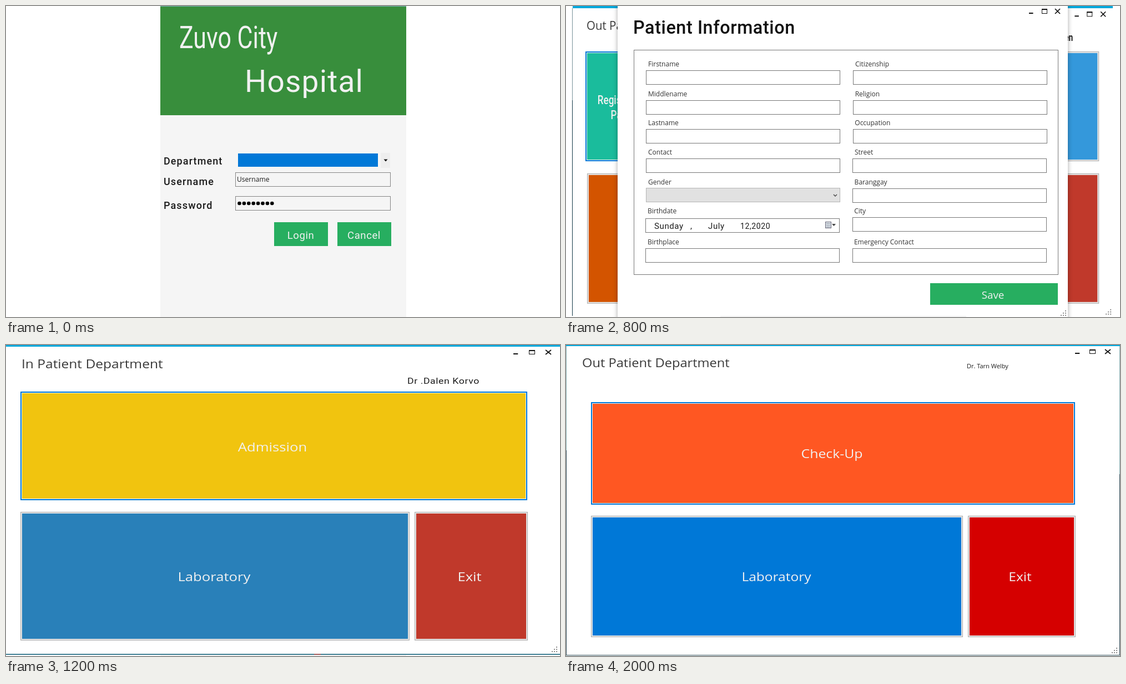
An HTML page with a canvas for the animation above (2.4 s loop, 998 by 561 pixels).

```html
<!DOCTYPE html>
<html lang="en">
<head>
<meta charset="utf-8">
<title>Hospital system screens</title>
<style>
  html, body { margin: 0; width: 100%; height: 100%; overflow: hidden; background: #fff; }
  canvas { display: block; width: 998px; height: 561px; }
</style>
</head>
<body>
<canvas id="stage" width="998" height="561"></canvas>
<script>
const ctx = document.getElementById('stage').getContext('2d');
const SCREEN_MS = 400;
const CYAN = '#00a8dc', BLUE = '#0078d7', GREEN = '#27ae60', DARK = '#1c1c1c', PALE = '#f1f1f1';

// Each face: family, weight, horizontal proportion, tracking
const FACES = {
  din:        ['Roboto, sans-serif', 400, 1, 0.6],
  dinBanner:  ['Roboto, sans-serif', 400, 1, 1.2],
  dinLabel:   ['Roboto, sans-serif', 500, 1, 1.1],
  dinHeading: ['Roboto, sans-serif', 500, 1, 0.6],
  dinNarrow:  ['Roboto, sans-serif', 400, 0.78, 0],
  dinNarrowMedium: ['Roboto, sans-serif', 500, 0.78, 0],
  dinNarrowBold: ['Roboto, sans-serif', 700, 0.75, 0],
  dinWide:    ['Roboto, sans-serif', 400, 1.14, 0.5],
  ui:         ['"Open Sans", sans-serif', 400, 1, 0],
  uiTight:    ['"Open Sans", sans-serif', 400, 0.93, 0],
  uiNarrow:   ['"Open Sans", sans-serif', 400, 0.85, 0],
  uiNarrowBold: ['"Open Sans", sans-serif', 700, 0.88, 0],
  uiWide:     ['"Open Sans", sans-serif', 400, 1.14, 0],
  uiWideTitle: ['"Open Sans", sans-serif', 400, 1.1, 0],
  grid:       ['"Liberation Sans", Arial, sans-serif', 400, 0.8, 0]
};

function text(str, x, y, size, face, color = DARK, align = 'left') {
  const [family, weight, proportion, tracking] = FACES[face];
  ctx.save();
  ctx.translate(x, y);
  ctx.scale(proportion, 1);
  ctx.font = `${weight} ${size}px ${family}`;
  ctx.letterSpacing = tracking + 'px';
  ctx.textAlign = align;
  ctx.fillStyle = color;
  ctx.fillText(str, 0, 0);
  ctx.restore();
}

function box(left, top, right, bottom, fill, border) {
  ctx.fillStyle = fill;
  ctx.fillRect(left, top, right - left, bottom - top);
  if (!border) return;
  ctx.strokeStyle = border;
  ctx.lineWidth = 1;
  ctx.strokeRect(left + 0.5, top + 0.5, right - left - 1, bottom - top - 1);
}

function line(points, color = '#111', width = 1) {
  ctx.beginPath();
  points.forEach(([x, y]) => ctx.lineTo(x, y));
  ctx.strokeStyle = color;
  ctx.lineWidth = width;
  ctx.stroke();
}

function chevron(x, y, dir, color = '#444') {
  line([[x - 3, y - dir * 1.5], [x, y + dir * 1.5], [x + 3, y - dir * 1.5]], color, 1.4);
}

function dropArrow(x, y, color = '#111') {
  ctx.fillStyle = color;
  ctx.beginPath();
  ctx.moveTo(x - 3.5, y - 2);
  ctx.lineTo(x + 3.5, y - 2);
  ctx.lineTo(x, y + 2);
  ctx.fill();
}

// Large button with a double frame; the focused one has a blue edge
function tile(left, top, right, bottom, fill, focusWidth = 0) {
  const edge = focusWidth || 1;
  const inset = focusWidth ? focusWidth + 1 : 3;
  box(left, top, right, bottom, focusWidth ? BLUE : '#adadad');
  box(left + edge, top + edge, right - edge, bottom - edge, focusWidth ? '#f4f4f4' : '#e4e4e4');
  box(left + inset, top + inset, right - inset, bottom - inset, fill);
}

function windowButtons(minX, maxX, closeX, top, w = 10, h = 9) {
  box(minX, top + h - 2, minX + w * 0.75, top + h, '#111');
  box(maxX, top, maxX + w, top + h, '#fff', '#111');
  box(maxX, top, maxX + w, top + 2, '#111');
  line([[closeX, top], [closeX + w - 1, top + h]], '#111', 1.7);
  line([[closeX + w - 1, top], [closeX, top + h]], '#111', 1.7);
}

function grip(right, bottom) {
  for (let row = 0; row < 3; row++)
    for (let col = 0; col < 3 - row; col++)
      box(right - 2 - col * 4, bottom - 2 - row * 4, right - col * 4, bottom - row * 4, '#8c8c8c');
}

function login() {
  box(278, 0, 721, 561, '#f5f5f5');
  box(278, 0, 721, 197, '#388e3c');
  box(278, 0, 721, 1, '#78adb4');
  text('Zuvo City', 312, 76, 55, 'dinNarrow', PALE);
  text('Hospital', 430, 155, 55, 'dinBanner', PALE);

  text('Department', 284, 286, 18, 'dinLabel');
  text('Username', 284, 323, 18, 'dinLabel');
  text('Password', 284, 366, 18, 'dinLabel');

  box(418, 266, 670, 290, BLUE);
  box(675, 265, 692, 292, '#eeeeee');
  dropArrow(684, 278.5);
  box(413, 300, 693, 326, '#f5f5f5', '#858585');
  text('Username', 416, 317, 13, 'uiTight');
  box(413, 343, 693, 369, '#f5f5f5', '#858585');
  ctx.fillStyle = '#000';
  for (let i = 0; i < 8; i++) {
    ctx.beginPath();
    ctx.arc(420.5 + i * 8.4, 356, 3.3, 0, 7);
    ctx.fill();
  }

  box(483, 390, 580, 433, GREEN);
  box(597, 390, 694, 433, GREEN);
  text('Login', 531, 419.5, 18.5, 'din', PALE, 'center');
  text('Cancel', 645, 419.5, 18.5, 'din', PALE, 'center');
}

function bottomStrip() {
  box(278, 559, 721, 561, '#f3f3f3');
}

function outPatientContent(focusWidth) {
  text('Out Patient Department', 35, 41, 22, 'uiTight', '#3a3a3a');
  text('Welcome', 679, 61, 18.5, 'dinNarrowBold');
  text(':', 744, 61, 18.5, 'dinNarrowBold');
  text('Nurse Meridan Jolsten', 914, 61, 18.5, 'dinNarrowBold', DARK, 'right');
  windowButtons(917, 939, 964, 8);

  tile(33, 80, 184, 279, '#1abc9c', focusWidth);
  tile(205, 80, 634, 279, '#f1c40f');
  tile(642, 80, 961, 279, '#3498db');
  tile(36, 301, 786, 537, '#d35400');
  tile(793, 301, 961, 537, '#c0392b');
  const label = (str, x, y) => text(str, x, y, 22, 'dinNarrowMedium', PALE, 'center');
  label('Register New', 106, 175);
  label('Patient', 106, 203);
  label('Search', 417, 190);
  label('Laboratory Result', 800, 190);
  label('Checkup', 409, 428);
  label('Exit', 875, 428);
  grip(983, 557);
}

function outPatientNurse() {
  box(12, 0, 985, 2, CYAN);
  outPatientContent(1);
  bottomStrip();
}

function patientForm() {
  box(12, 0, 985, 4, CYAN);
  ctx.save();
  ctx.transform(0.997, 0, 0, 0.9955, 2.1, 2.3);
  outPatientContent(2);
  ctx.restore();
  box(11, 4, 12, 170, '#78929a');
  box(11, 170, 12, 559, '#163a48');

  ctx.save();
  ctx.shadowColor = 'rgba(0,0,0,.35)';
  ctx.shadowBlur = 8;
  box(93, -20, 904, 580, '#fff');
  ctx.restore();
  bottomStrip();
  windowButtons(834, 857, 881, 5);
  text('Patient Information', 121, 50, 32.3, 'dinHeading', '#111');
  box(122, 79, 887, 485, '#fff', '#777');

  const tops = [116, 170, 222, 275, 329, 381, 437];
  const left = ['Firstname', 'Middlename', 'Lastname', 'Contact', 'Gender', 'Birthdate', 'Birthplace'];
  const right = ['Citizenship', 'Religion', 'Occupation', 'Street', 'Baranggay', 'City', 'Emergency Contact'];
  tops.forEach((top, i) => {
    const drift = i > 4 ? 1 : 0;
    const labelY = top - 7;
    text(left[i], 148 - drift, labelY, 12, 'ui', '#333');
    text(right[i], 521 - i * 0.35, labelY, 12, 'ui', '#333');
    const leftTop = i === 4 ? 328 : i === 5 ? 383 : top;
    if (i === 4) box(144, leftTop, 494, leftTop + 26, '#e1e1e1', '#b5b5b5');
    else box(144 - drift, leftTop, 494 - drift, leftTop + 26, '#fff', '#777');
    const x = i < 3 ? 517 : 516;
    box(x, top, x + 350, top + 26, '#fff', '#777');
  });
  chevron(485, 341.5, 1);

  text('Sunday', 159, 402, 15, 'din');
  text(',', 224, 402, 15, 'din');
  text('July', 256, 402, 15, 'din');
  text('12,2020', 314, 402, 14, 'din');
  box(467, 389, 478, 401, '#dde3ea', '#667');
  for (let y = 392; y < 400; y += 3) box(469, y, 476, y + 1, '#8a93a0');
  dropArrow(482.5, 395, '#444');

  box(656, 500, 886, 539, GREEN);
  text('Save', 769, 527.5, 18.8, 'ui', PALE, 'center');
  grip(901, 559);
}

function inPatient() {
  box(0, 0, 998, 3, CYAN);
  text('In Patient Department', 28, 42, 22.3, 'uiWideTitle', '#3a3a3a');
  text('Dr .Dalen Korvo', 723, 70, 15.5, 'dinWide');
  windowButtons(914, 942, 972, 9, 11, 8);
  tile(26, 84, 939, 280, '#f1c40f', 2);
  tile(26, 301, 727, 533, '#2980b9');
  tile(736, 301, 940, 533, '#c0392b');
  text('Admission', 480, 192, 22.5, 'uiWide', PALE, 'center');
  text('Laboratory', 375, 426, 22.5, 'uiWide', PALE, 'center');
  text('Exit', 835, 426, 22.5, 'uiWide', PALE, 'center');
  grip(993, 554);
  box(0, 557, 998, 559, '#3f7f92');
  box(555, 557, 567, 559, '#a35d5d');
  bottomStrip();
}

const medicines = `Acetazolamide 250 mg|20|13
Acetylcysteine 100 m|9|26
Acetylcysteine 200 m|10|26
Acetylcysteine 600 m|22|13
Aciclovir 200 mg Tab|5|13
Aciclovir 25 mg/mL,|977|13
Aciclovir 400 mg Tab|13|13
Aciclovir 800 mg Tab|40|13
Adenosine 3 mg/mL, 2|221|13
Albumin, Human 20%,|1920|13
Albumin, Human 25%,|2275|13
Alcohol, Ethyl 70% s|50|13
Alendronate Sodium 7|129|13
All-in-One Admixture|2000|65
Allopurinol 100 mg T|3|13
Allopurinol 300 mg T|2|13
Alprazolam 250 mcg T|4|13
Alprazolam 500 mcg T|18|13
Aluminum Hydroxide +|35|34
Amikacin (as Sulfate|23|119
Amino Acid Solutions|301|51
Amino Acids, Crystal|800|102
Aminophylline 25 mg/|23|17`.split('\n').map((row, i) => [i + 1, ...row.split('|')]);

function pharmacy() {
  box(0, 0, 998, 3, CYAN);
  text('Pharmacy', 17, 35, 18.7, 'uiNarrow', '#3a3a3a');
  windowButtons(945, 962, 981, 8, 8, 7);
  text('Medicine', 22, 82, 11, 'uiNarrow');
  text('Medicine Request', 69, 82, 11, 'uiNarrow');
  box(19, 92, 967, 505, '#f0f0f0');
  box(19, 90, 967, 92, '#c8c8c8');
  box(19, 89, 67, 92, CYAN);

  box(30, 127, 951, 454, '#fff', '#868a90');
  const columns = [36, 184, 332, 539];
  const cells = (row, y) => row.forEach((cell, i) => text(cell, columns[i], y, 9.8, 'grid', '#111'));
  for (const x of [179, 327, 534, 742]) box(x, 129, x + 1, 453, '#ececec');
  cells(['ID', 'Name', 'Price', 'Quantity'], 141.5);
  medicines.forEach((row, i) => {
    const y = 157.5 + i * 13.1;
    box(31, Math.round(y + 2.5), 937, Math.round(y + 3.5), '#f0f0f0');
    cells(row, y);
  });

  box(937, 128, 949, 453, '#f0f0f0');
  box(937, 142, 948, 155, '#c9c9c9');
  chevron(942.5, 135.5, -1);
  chevron(942.5, 445.5, 1);
  box(683, 477, 814, 496, '#cccccc', '#b5b5b5');
  box(828, 477, 951, 496, '#f0f0f0', '#cccccc');
  text('Save Product', 748, 490, 9, 'uiNarrowBold', '#888', 'center');
  text('Import Product', 888, 490, 9, 'uiNarrowBold', '#111', 'center');
  grip(996, 558);
}

function outPatientDoctor() {
  box(0, 0, 998, 2, CYAN);
  for (const [x, split] of [[0, 190], [997, 233]]) {
    box(x, 2, x + 1, split, '#86aeb2');
    box(x, split, x + 1, 560, '#2a4652');
  }
  box(0, 559, 998, 560, '#35525c');
  text('Out Patient Department', 29, 39.5, 21.5, 'uiWideTitle', '#3a3a3a');
  text('Dr. Tarn Welby', 722, 42, 11, 'ui');
  windowButtons(917, 943, 971, 8, 11, 8);
  tile(45, 103, 917, 288, '#ff5722', 2);
  tile(45, 308, 715, 527, BLUE);
  tile(724, 308, 918, 527, '#d50000');
  text('Check-Up', 479, 204, 21.8, 'uiWide', PALE, 'center');
  text('Laboratory', 379, 426, 21.5, 'uiWide', PALE, 'center');
  text('Exit', 818, 426, 21.5, 'uiWide', PALE, 'center');
  grip(993, 556);
}

const screens = [login, outPatientNurse, patientForm, inPatient, pharmacy, outPatientDoctor];

function draw() {
  const index = Math.floor(performance.now() / SCREEN_MS) % screens.length;
  box(0, 0, 998, 561, '#fff');
  screens[index]();
  requestAnimationFrame(draw);
}
draw();
</script>
</body>
</html>
```
